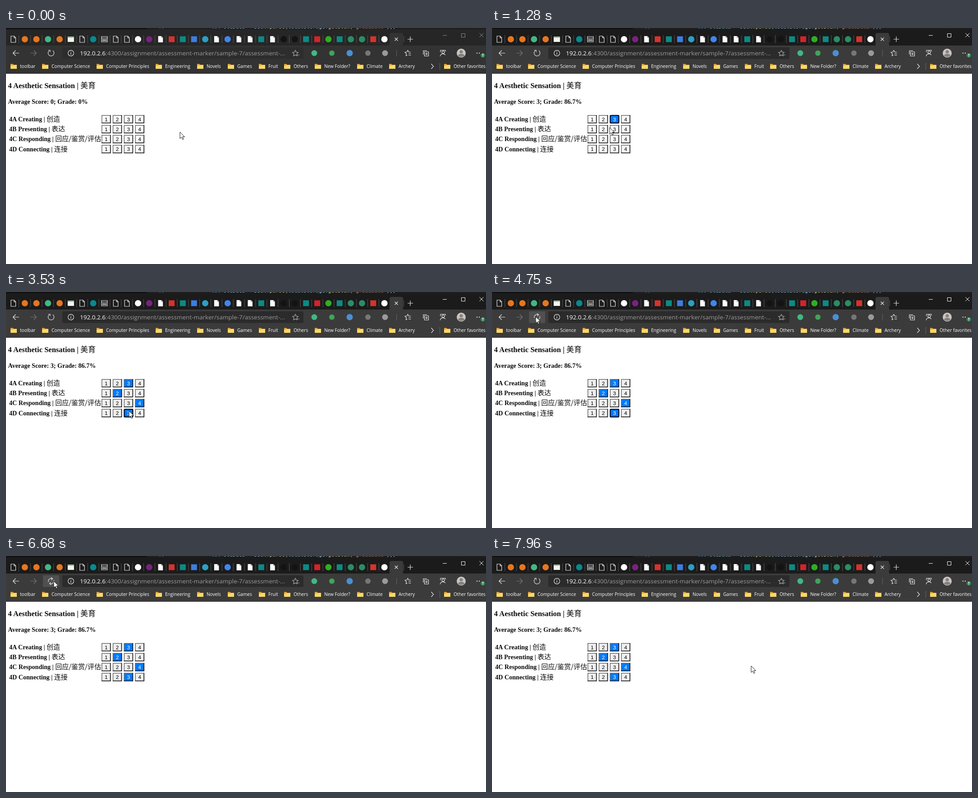
An HTML page for the animation above (8000 ms loop, 1065 by 526 pixels).

```html
<!DOCTYPE html>
<html lang="en">
<head>
<meta charset="utf-8">
<title>Score sheet</title>
<style>
html, body { margin: 0; width: 100%; height: 100%; overflow: hidden; background: #fff; }
svg { display: block; }
svg { --frame: #1b1b1b; --bar: #3b3b3b; --pill: #2b2b2b; --control: #fff; --key: #efefef; }
svg.idle { --frame: #262626; --bar: #333; --pill: #2d2d2d; --control: #8c8c8c; }
svg.fresh { --key: #f8f8f8; }
.frame { fill: var(--frame); }
.bar { fill: var(--bar); }
.pill { fill: var(--pill); }
.line { fill: none; stroke: #e8e8e8; stroke-width: 1.2; }
.dim { stroke: #777; }
.control { fill: none; stroke: var(--control); stroke-width: 1; }
.ui { font: 10.1px 'Open Sans', 'Noto Sans', sans-serif; fill: #fff; }
.url { font: 13.5px 'Open Sans', 'Noto Sans', sans-serif; fill: #9b9b9b; }
.code { font: 11.35px 'DejaVu Sans Mono', monospace; fill: #9cdcfe; }
.page { font: bold 14.1px 'Liberation Serif', 'Times New Roman', serif; fill: #0c0c0c; }
.title { font-size: 16.5px; }
.cjk { font: 500 15px 'Noto Sans CJK SC', 'Noto Sans CJK', sans-serif; }
.title .cjk { font-size: 17px; font-weight: 400; }
.key { fill: var(--key); }
.digit { font: 11.8px 'Liberation Sans', Arial, sans-serif; text-anchor: middle; fill: #000; }
.ring { fill: none; stroke: #0a0a14; stroke-width: 2; visibility: hidden; }
.on .key { fill: #007bff; }
.on .digit { fill: #fff; }
.focus .ring { visibility: visible; }
</style>
</head>
<body>
<svg id="stage" width="1065" height="526" viewBox="0 0 1065 526">
  <rect width="1065" height="526" fill="#fff"/>
  <rect class="frame" width="1065" height="40"/>
  <rect width="313" height="3" fill="#121212"/>
  <rect x="313" width="752" height="3" fill="#1e1e1e"/>
  <svg width="1065" height="3">
    <text class="code" x="340" y="1" fill-opacity=".5">//</text>
    <text class="code" x="455" y="1" xml:space="preserve"><tspan fill="#569cd6">let</tspan> oldData = JSON.<tspan fill="#dcdcaa">parse</tspan>(localStorage.<tspan fill="#dcdcaa">getItem</tspan>(<tspan fill="#ce9178">'gradeData'</tspan>));</text>
  </svg>
  <rect class="bar" y="39" width="1065" height="63"/>
  <path class="bar" d="M851 40V15q0-4 4-4h22q4 0 4 4v25z"/>
  <g id="tabs"></g>
  <path class="line" d="M862.5 21.5l7 7m0-7l-7 7M891 25h12m-6-6v12"/>
  <path d="M882.5 18v14" stroke="#555"/>
  <path class="control" d="M969 16.5h9M1010.500 12.500h8v8h-8zM1050.500 11.500l9 9m0-9l-9 9"/>

  <rect id="hover" x="82" y="43" width="36" height="26" rx="2" fill="#505050"/>
  <path class="line" d="M29 56H16m5.500-6L15.500 56l6 6"/>
  <path class="line dim" d="M54 56h13m-5.500-6l6 6l-6 6"/>
  <g id="reload" class="line">
    <path d="M96 50.500a6.600 6.600 0 1 0 8 0M94 49.500h4v4"/>
  </g>
  <g id="loading" class="line">
    <path d="M94 58a6.500 6.500 0 0 1 9-7.500M106 54a6.500 6.500 0 0 1-9 7.500M100 48l3.500 2.500l-3 3M100 64l-3.500-2.500l3-3"/>
  </g>
  <rect class="pill" x="125" y="43" width="535" height="26" rx="3"/>
  <circle class="line" cx="144" cy="56" r="6.300"/>
  <path class="line" d="M144 55v4.500M144 52.300v1.400"/>
  <text class="url" x="164" y="61"><tspan fill="#fff">192.0.2.6</tspan>:4300/assignment/assessment-marker/sample-7/assessment-...</text>
  <g class="line" stroke-linejoin="round">
    <path style="stroke:#aaa" d="M642 49.500l2 4.300l4.500.6l-3.300 3.200l.8 4.700l-4-2.200l-4 2.200l.8-4.700l-3.300-3.200l4.500-.6zM646 60h5"/>
    <path d="M898 53.500h-4.500l-2-4l-2 4l-4.500.6l3.300 3.200l-.8 4.700l3-1.700M893 57h5.500M893 60.500h5.500"/>
    <path d="M926 59V50.500h8M928.500 53h9v9.500h-9zM933 55v5.500m-2.700-2.700h5.500"/>
    <circle cx="970" cy="54" r="2.800"/>
    <path d="M963 63l2-4q5-3 10 1M964 54v-4.500h11v3"/>
  </g>
  <path d="M866.500 49v14" stroke="#666"/>
  <circle id="badge" cx="684" cy="56" r="6.500"/>
  <circle cx="723" cy="56" r="6" fill="#3fa45a"/>
  <circle cx="762.500" cy="56" r="7" fill="#4b8fd0"/>
  <circle cx="803" cy="56" r="6" fill="#777"/>
  <circle cx="841" cy="56" r="6.500" fill="#9a9a9a"/>
  <circle cx="1010" cy="56" r="10" fill="#c9c5c2"/>
  <circle cx="1010" cy="53" r="3.600" fill="#85807c"/>
  <path d="M1003 62q0-4.500 7-4.500t7 4.500q-7 5-14 0" fill="#85807c"/>
  <path d="M1044 56h2m3 0h2" stroke="#eee" stroke-width="2"/>
  <circle cx="1058" cy="61" r="5" fill="#2e8b57"/>
  <path d="M1058 64v-6m-2 2l2-2l2 2" fill="none" stroke="#fff"/>
  <g id="marks"></g>
  <path class="line" d="M943.500 80l5 5.500l-5 5.500"/>
  <path d="M962.500 78v15" stroke="#666"/>

  <g class="page">
    <text id="bare" class="title" x="4.500" y="134" style="fill:#287f9c">|</text>
    <text id="title" class="title" x="4.500" y="134">4 Aesthetic Sensation | <tspan class="cjk">美育</tspan></text>
    <text id="score" x="4.500" y="169"></text>
    <g id="table"></g>
  </g>
  <path id="arrow" d="M0 0V14.500L3.400 11.400L5.800 16.600L8.100 15.600L5.800 10.500H10.300Z" fill="#fff" stroke="#000" stroke-width=".9"/>
  <path id="beam" d="M-3-6.500q3 0 3 1.500q0-1.500 3-1.500M0-5V5M-3 6.500q3 0 3-1.500q0 1.500 3 1.500" fill="none" stroke="#222"/>
</svg>
<script>
const $ = id => document.getElementById(id);
const stage = $('stage');
const LOOP = 8000;

// Tab icons: o outlined sheet, s filled sheet, w window, c/q plain disc or square
const tabs = ('o c#e8761f c#e8761f c#41b883 c#e8761f w o c#058b91 v o o c#fff c#7b2182 s q#d8322c ' +
  'q#0c8a84 q#3d7de0 c#2b9fc4 s c#3f86ee s s q#0c8a84 s c#131313 c#131313 q#0c8a84 q#d3232b ' +
  'c#2fae22 q#0c8a84 c#2a8d67 c#2a8d67 q#d8322c c#fff').split(' ');
const sheet = 'M-5-7H2L5.500-3.500V7H-5z';
const icons = {
  o: () => `<path class="line" d="${sheet}M2-7v4h3.500"/>`,
  s: () => `<path fill="#fff" d="${sheet}"/><path d="M2-7v3.500h3.500" fill="none" stroke="#999"/>`,
  w: () => '<rect x="-7" y="-6" width="14" height="12" fill="#f5f5f0"/><path d="M-7-4.500H7" stroke="#6bae75" stroke-width="2"/>',
  v: () => '<path class="line" d="M-6.500-6h13V6h-13zM-6.500-2.500h13M-4 .500h3v3h-3zM1 .500h3v3h-3z"/>',
  c: fill => `<circle r="7" fill="${fill}"/>`,
  q: fill => `<rect x="-6.500" y="-6.500" width="13" height="13" fill="${fill}"/>`
};
$('tabs').innerHTML = tabs.map((tab, i) => {
  const x = i < 4 ? 16 + i * 25.75 : 119 + (i - 4) * 24.85;
  return `<g transform="translate(${x} 25)">${icons[tab[0]](tab.slice(1))}` +
    (i < 33 ? '<path d="M12.500-9V9" stroke="#555"/>' : '') + '</g>';
}).join('');

const marks = { 10: 'toolbar', 80: 'Computer Science', 201: 'Computer Principles', 332: 'Engineering',
  424: 'Novels', 492: 'Games', 561: 'Fruit', 617: 'Others', 685: 'New Folder?', 779: 'Climate',
  850: 'Archery', 972: 'Other favorites' };
$('marks').innerHTML = Object.entries(marks).map(([x, name]) =>
  `<g transform="translate(${x} 79)"><path d="M0 1h5l2 2h7v8H0z" fill="#dca62f"/>
   <path d="M0 4.500h5l1.500-1H14V12H0z" fill="#ffd767"/><text class="ui" x="21" y="10">${name}</text></g>`).join('');

const rows = [['4A Creating', '创造'], ['4B Presenting', '表达'], ['4C Responding', '回应/鉴赏/评估'], ['4D Connecting', '连接']];
const key = (row, n) => `<g id="k${row}${n}" transform="translate(${187.2 + n * 24.8} ${194 + row * 22.2})">
  <rect class="key" width="20.500" height="18.500"/>
  <path d="M.7 18V.7H20" fill="none" stroke="#6a6a6a" stroke-width="1.500"/>
  <path d="M0 17.700H19.700V0" fill="none" stroke="#1c1c1c" stroke-width="1.700"/>
  <rect class="ring" x=".8" y=".8" width="19" height="17" rx="2.500"/>
  <text class="digit" x="10.200" y="13.600">${n}</text></g>`;
$('table').innerHTML = rows.map(([name, cjk], row) =>
  `<text x="7" y="${208 + row * 22.2}">${name} | <tspan class="cjk">${cjk}</tspan></text>` +
  [1, 2, 3, 4].map(n => key(row, n)).join('')).join('');

// Pointer stops: time, x, y
const stops = [
  [0, 386, 232], [430, 372, 228], [570, 332, 216], [700, 292, 207], [840, 271, 203], [980, 268, 203],
  [1120, 266, 207], [1280, 261, 222], [1400, 250, 226], [1540, 246, 225], [1820, 249, 228],
  [1960, 268, 238], [2100, 290, 245], [2380, 288, 255], [2510, 277, 265], [2630, 273, 264],
  [3530, 273, 265], [4090, 262, 252], [4230, 214, 186], [4360, 150, 112], [4500, 108, 66], [4630, 98, 56],
  [4750, 97, 55], [5890, 81, 159], [6040, 84, 148], [6160, 92, 108], [6290, 102, 68], [6420, 105, 57],
  [6540, 106, 56], [6960, 108, 55], [7110, 111, 55], [7230, 138, 76], [7380, 236, 136], [7520, 372, 194],
  [7670, 482, 226], [7810, 550, 241], [7960, 575, 245]
];
// Clicks: time, row, value
const clicks = [[980, 0, 3], [1680, 1, 2], [2240, 2, 4], [2780, 3, 3]];
const within = (t, a, b) => t >= a && t < b;
const show = (id, on) => $(id).style.display = on ? '' : 'none';

function scoreText(done) {
  if (!done.length) return 'Average Score: 0; Grade: 0%';
  const mean = done.reduce((sum, c) => sum + c[2], 0) / done.length;
  const grade = 60 + (mean - 1) * 40 / 3;
  return `Average Score: ${mean}; Grade: ${+grade.toFixed(1)}%`;
}

function draw(t) {
  const blank = within(t, 4900, 5050) || within(t, 6800, 7230);
  const done = blank ? [] : clicks.filter(c => t >= c[0]);
  stage.classList.toggle('idle', t < 980);
  stage.classList.toggle('fresh', t < 1540);

  show('title', !blank);
  show('table', !blank);
  show('bare', blank);
  $('score').textContent = scoreText(done);
  clicks.forEach(([, row, n], i) => {
    const button = $(`k${row}${n}`);
    button.classList.toggle('on', i < done.length);
    button.classList.toggle('focus', i === done.length - 1 && t < 4900);
  });

  const [, x, y] = stops.findLast(s => t >= s[0]);
  const overText = within(t, 5890, 6160);
  for (const id of ['arrow', 'beam']) $(id).setAttribute('transform', `translate(${x} ${y})`);
  show('arrow', !overText);
  show('beam', overText);

  const loading = within(t, 4750, 4900) || within(t, 6670, 6800);
  show('hover', within(x, 82, 118) && within(y, 43, 69));
  show('loading', loading);
  show('reload', !loading);
  $('badge').setAttribute('fill', within(t, 4900, 5050) || within(t, 6960, 7230) ? '#8a8a8a' : '#41b883');
}

const start = performance.now();
function tick() {
  draw((performance.now() - start) % LOOP);
  requestAnimationFrame(tick);
}
tick();
</script>
</body>
</html>
```
